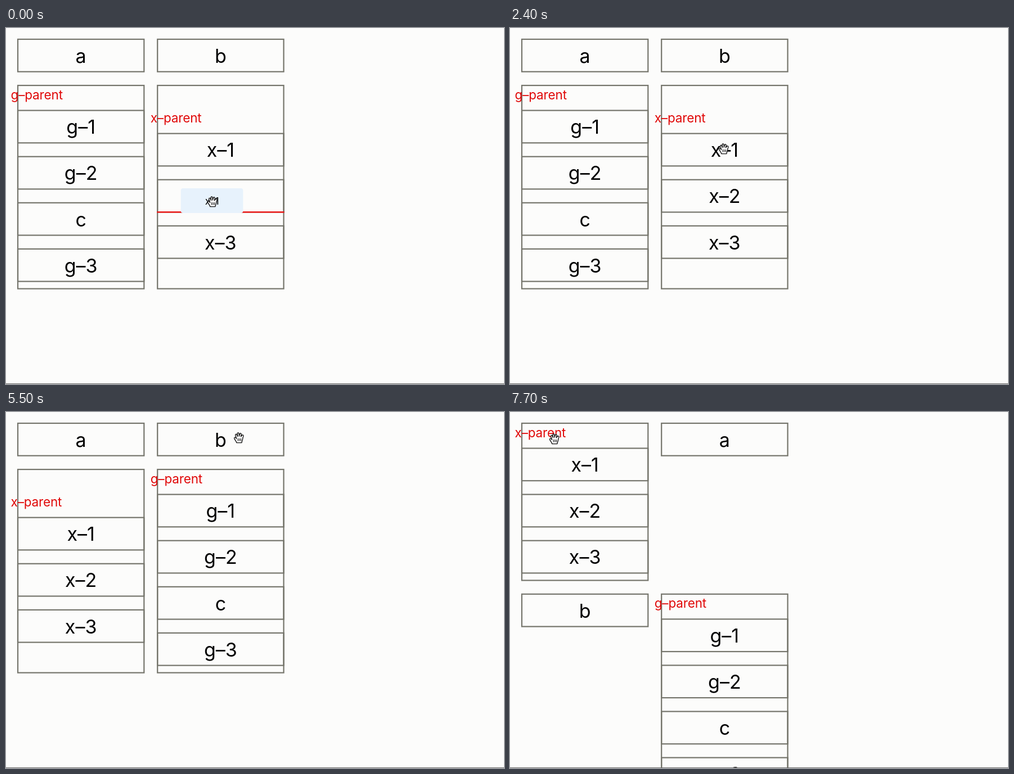
Write an HTML page that moves like this. It is 885x633 px and loops after 8 s.

```html
<!DOCTYPE html>
<html lang="en">
<head>
<meta charset="utf-8">
<title>Nested drag and drop</title>
<style>
  html, body { margin: 0; width: 100%; height: 100%; overflow: hidden; background: #fcfcfb; }
  svg { display: block; width: 885px; height: 633px; font-family: Inter, "Open Sans", sans-serif; font-feature-settings: "calt" 0; }
  .box { fill: none; stroke: #75756c; stroke-width: 2.2; }
  .name { font-size: 34px; text-anchor: middle; }
  .label { font-size: 22.5px; letter-spacing: -.15px; fill: #e00808; }
  .mark { stroke: #f91010; stroke-width: 2.2; }
  .chip rect { fill: #e7f2fc; }
  .chip text { font-size: 17.5px; letter-spacing: -.3px; text-anchor: middle; }
  .hand path { fill: #fff; stroke: #111; stroke-width: 1.4; stroke-linejoin: round; stroke-linecap: round; }
  .hand .palm { stroke-width: 1.1; }
</style>
</head>
<body>
<svg viewBox="0 0 885 633">
  <g id="board"></g>
  <path d="M0 632.5H885" stroke="#666" />
  <g id="chip" class="chip">
    <rect x="-55.3" y="-22" width="110.6" height="44" rx="4" />
    <text id="chipText" y="6.5"></text>
  </g>
  <g id="hand" class="hand">
    <path d="M-4.2 8.6C-4.6 6-7.6 3.4-8.3 1C-8.8-1-6.8-1.5-5.6-.1L-4.4 1.3L-6.3-4.4C-6.9-6.8-4.4-7.5-3.6-5.2L-2.5-2.4L-2.9-7.2C-3-9.5-.2-9.6 0-7.2L.3-2.9L1.4-6.9C2-9 4.5-8.4 4.1-6.2L3.4-2.1L5.1-4.5C6.5-6.2 8.7-4.8 7.7-2.5C6.5 0 6.8 2.4 5.8 4.7L4.8 8.6Z" />
    <path class="palm" d="M-1.7 1.2v4M.9 1.2v4M3.4 1.2v4" />
  </g>
</svg>
<script>
const LOOP = 8000, STEP = 100;
const LEFT = 21, PITCH = 248.2, WIDTH = 224.3, TOP = 20;
const LEAF = 57.7, GAP = 24.4, HEAD = 44.5, FOOT = 13;
const $ = id => document.getElementById(id);

const initial = {
  root: ['a', 'b', 'g', 'x'],
  g: ['g–1', 'g–2', 'c', 'g–3'],
  x: ['x–1', 'x–2', 'x–3']
};

// Poses are [time, x, y]; grip is the chip's offset from the hand.
const drags = [
  { item: 'x–1', grip: [-1, -2], grab: [0, 367, 309], arrive: [300, 369, 311], drop: 500, rest: [800, 366.5, 296] },
  { item: 'x–1', grip: [-1, 9], grab: [1200, 366.5, 296], arrive: [2100, 380, 214], drop: 2100, rest: [2400, 380, 215] },
  { item: 'x', grip: [-3, 1], grab: [3800, 340, 118], arrive: [4300, 407, 51], drop: 5100, rest: [5500, 414, 46] },
  { item: 'x', grip: [-3, 2], grab: [5900, 168, 110], arrive: [6700, 170, 26], drop: 7000, rest: [7700, 79, 48] }
];

const poses = drags.flatMap(({ grab, arrive, drop, rest }) =>
  [grab, arrive, [drop, arrive[1], arrive[2]], rest]);

const ease = k => k * k * (3 - 2 * k);

function handAt(t) {
  const i = poses.findIndex(p => p[0] > t);
  if (i < 0) return poses.at(-1).slice(1);
  const [t0, x0, y0] = poses[i - 1], [t1, x1, y1] = poses[i];
  const k = ease((t - t0) / (t1 - t0));
  return [x0 + (x1 - x0) * k, y0 + (y1 - y0) * k];
}

// Two-column grid: groups stretch to their row and centre their items.
function layout(state) {
  const boxes = [];
  const height = id => {
    const n = state[id]?.length;
    return n ? HEAD + n * LEAF + (n - 1) * GAP + FOOT : LEAF;
  };
  let y = TOP;
  for (let i = 0; i < state.root.length; i += 2) {
    const row = state.root.slice(i, i + 2);
    const rowHeight = Math.max(...row.map(height));
    row.forEach((id, col) => {
      const x = LEFT + col * PITCH, items = state[id];
      const shift = items ? (rowHeight - height(id)) / 2 : 0;
      boxes.push({ id, x, y, h: items ? rowHeight : LEAF, group: !!items, shift });
      items?.forEach((item, n) => boxes.push({
        id: item, parent: id, x, y: y + shift + HEAD + n * (LEAF + GAP), h: LEAF
      }));
    });
    y += rowHeight + GAP;
  }
  return boxes;
}

// The innermost box under the hand, and the edge that gets marked.
function findTarget(boxes, item, [hx, hy]) {
  const box = boxes.filter(b => b.id !== item && b.parent !== item
    && hx > b.x && hx < b.x + WIDTH && hy > b.y && hy < b.y + b.h).pop();
  if (!box) return null;
  const side = box.group ? 'left' : hy < box.y + box.h / 2 ? 'top' : 'bottom';
  return { id: box.id, side };
}

function move(state, item, target) {
  const next = {};
  for (const key in state) {
    const list = state[key].filter(id => id !== item);
    const at = list.indexOf(target.id);
    if (at >= 0) list.splice(at + (target.side === 'bottom' ? 1 : 0), 0, item);
    next[key] = list;
  }
  return next;
}

const layouts = [layout(initial)];
drags.reduce((state, { item, drop }) => {
  const next = move(state, item, findTarget(layouts.at(-1), item, handAt(drop)));
  layouts.push(layout(next));
  return next;
}, initial);

const text = (cls, x, y, s) => `<text class="${cls}" x="${x}" y="${y}">${s}</text>`;

function edge({ x, y, h }, side) {
  const d = side === 'left' ? `M${x} ${y - 1}v${h + 2}`
    : `M${x - 1} ${side === 'top' ? y : y + h}h${WIDTH + 2}`;
  return `<path class="mark" d="${d}"/>`;
}

function board(boxes, target) {
  let base = '', top = '';
  for (const b of boxes) {
    base += `<rect class="box" x="${b.x}" y="${b.y}" width="${WIDTH}" height="${b.h}"/>`;
    const mark = target?.id === b.id ? edge(b, target.side) : '';
    if (b.group) {
      base += mark;
      top += text('label', b.x - 12.5, b.y + b.shift + 24.5, b.id + '–parent');
    } else {
      base += text('name', b.x + WIDTH / 2, b.y + 41.7, b.id);
      top += mark;
    }
  }
  return base + top;
}

let shown;
function draw(ms) {
  const t = Math.floor(ms % LOOP / STEP) * STEP;
  const boxes = layouts[drags.filter(d => d.drop <= t).length];
  const drag = drags.find(d => t >= d.grab[0] && t < d.drop);
  const [hx, hy] = handAt(t);
  const markup = board(boxes, drag && findTarget(boxes, drag.item, [hx, hy]));
  if (markup !== shown) $('board').innerHTML = shown = markup;
  $('hand').setAttribute('transform', `translate(${hx} ${hy})`);
  $('chip').style.display = drag ? '' : 'none';
  if (drag) {
    const [dx, dy] = drag.grip;
    $('chip').setAttribute('transform', `translate(${hx + dx} ${hy + dy})`);
    $('chipText').textContent = initial[drag.item] ? '' : drag.item;
  }
}

let start;
function tick(now) {
  start ??= now;
  draw(now - start);
  requestAnimationFrame(tick);
}
draw(0);
requestAnimationFrame(tick);
</script>
</body>
</html>
```
